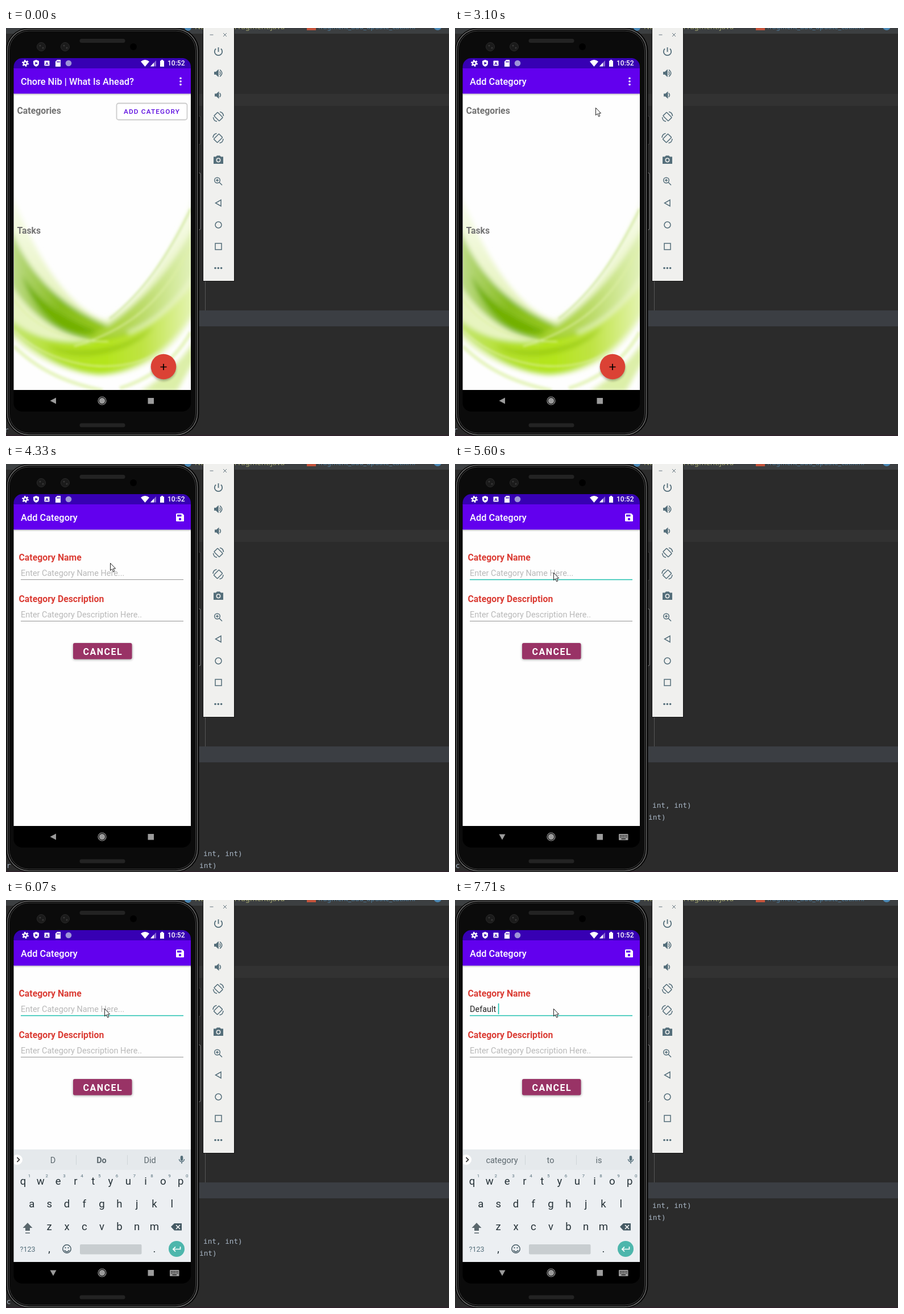
An HTML page for the animation above (8 s loop, 779x718 px).

```html
<!DOCTYPE html>
<html lang="en">
<head>
<meta charset="utf-8">
<title>Add a category</title>
<style>
html, body { margin: 0; width: 100%; height: 100%; overflow: hidden; background: #2b2b2b; }
svg { display: block; width: 779px; height: 718px; }
text { font-family: Roboto, sans-serif; white-space: pre; }
.mid { text-anchor: middle; }
.log text { font: 12.7px "DejaVu Sans Mono", monospace; fill: #a9b7c6; }
.tab text { font: 13.2px "Noto Sans", sans-serif; }
.title { font-size: 16.4px; font-weight: 500; fill: #fff; }
.head { font-size: 15.8px; font-weight: 700; fill: #737373; }
.red { fill: #db3d35; }
.field { font-size: 14.45px; fill: #b8b8b8; }
.keys { font-size: 18.6px; fill: #263238; }
.line { fill: none; stroke: #546e7a; stroke-width: 1.5; }
.solid { fill: #546e7a; }
</style>
</head>
<body>
<svg viewBox="0 0 779 718">
<defs>
  <clipPath id="page"><rect x="14" y="115" width="311" height="522"/></clipPath>
  <clipPath id="screen"><rect x="13.500" y="53" width="311.500" height="622" rx="15"/></clipPath>
  <filter id="soft" x="-20%" y="-20%" width="140%" height="140%"><feGaussianBlur stdDeviation="4"/></filter>
  <filter id="fine" x="-20%" y="-20%" width="140%" height="140%"><feGaussianBlur stdDeviation="2"/></filter>
  <linearGradient id="left"><stop stop-color="#bfdc8c"/><stop offset=".4" stop-color="#86bd1c"/><stop offset="1" stop-color="#a2d020"/></linearGradient>
  <linearGradient id="right"><stop stop-color="#a0d020"/><stop offset=".5" stop-color="#bada66"/><stop offset="1" stop-color="#e4f3bf"/></linearGradient>
  <linearGradient id="lime"><stop stop-color="#c6e678"/><stop offset=".25" stop-color="#b4e02e"/><stop offset=".5" stop-color="#b4e51a"/><stop offset=".72" stop-color="#bfe344"/><stop offset="1" stop-color="#e6f5b8"/></linearGradient>
  <linearGradient id="wash" x2="0" y2="1"><stop stop-color="#fafdf0"/><stop offset=".6" stop-color="#e6f3bf"/><stop offset="1" stop-color="#e9f6bf"/></linearGradient>
  <linearGradient id="shade" x2="0" y2="1"><stop stop-opacity=".25"/><stop offset="1" stop-opacity="0"/></linearGradient>
</defs>

<!-- editor -->
<rect width="779" height="718" fill="#2b2b2b"/>
<rect width="779" height="10" fill="#3c3f41"/>
<g class="tab">
  <circle cx="320" cy="-1" r="6" fill="#4a88b5"/>
  <text x="332" y="2" fill="#a5a872">NewCatListFragment.java</text>
  <rect x="529" y="-9" width="16" height="13" fill="#c4533b"/>
  <text x="549" y="2" fill="#4f7d9c" style="font-size:12px">fragment_add_update_cat.xml</text>
  <circle cx="759" cy="-3" r="7" fill="#4a88b5"/>
</g>
<rect y="116" width="779" height="21" fill="#323232"/>
<path d="M350.5 440V497" stroke="#555"/>
<rect y="497" width="779" height="28" fill="#3b3e43"/>
<g class="log" id="log">
  <text x="-3" y="-17">r</text>
  <text x="347" y="4">int, int)</text>
  <text x="-7" y="25">er</text><text x="340" y="25">int)</text>
  <text x="-7" y="110">ic</text>
</g>
<path d="M0 717H779" stroke="#30232c" stroke-width="2"/>

<!-- phone -->
<rect x="336" y="155" width="6" height="50" rx="2" fill="#111" stroke="#4a4a4a"/>
<rect x="336" y="255" width="6" height="100" rx="2" fill="#111" stroke="#888"/>
<rect x="0" y="0" width="339.500" height="718" rx="40" fill="#050505"/>
<rect x="2.500" y="2" width="334" height="714" rx="38" fill="none" stroke="#6a6a6a" stroke-width="1.500"/>
<rect x="5.500" y="5" width="328" height="708" rx="35" fill="#0b0b0b" stroke="#444"/>
<path d="M133 22.500H206M133 699H206" stroke="#232323" stroke-width="7" stroke-linecap="round"/>
<g fill="#1b1b1b" stroke="#2a2a2a"><circle cx="62" cy="33" r="7.500"/><circle cx="104" cy="33" r="7.500"/></g>
<g fill="#383838"><circle cx="60" cy="31" r="1.500"/><circle cx="65" cy="35" r="1.500"/><circle cx="102" cy="31" r="1.500"/><circle cx="107" cy="35" r="1.500"/></g>
<circle cx="224" cy="33" r="6" fill="#000"/>

<g clip-path="url(#screen)">
  <rect x="13" y="53" width="312" height="622" fill="#000"/>
  <rect x="13" y="115" width="312" height="522" fill="#fefefe"/>

  <g id="home" clip-path="url(#page)">
    <g filter="url(#soft)">
      <path d="M8 285C50 400 110 495 175 514C240 485 300 380 332 290V500C290 580 230 610 165 612C90 605 30 570 8 540Z" fill="url(#wash)"/>
      <path d="M8 350C40 440 110 505 225 540C170 568 70 548 8 450Z" fill="url(#left)"/>
      <path d="M332 345C290 425 240 490 140 548C220 550 290 500 332 425Z" fill="url(#right)"/>
      <path d="M8 512C50 550 100 556 165 550C240 542 290 500 332 445V485C300 560 230 609 165 610C110 608 50 575 8 530Z" fill="url(#lime)"/>
      <path d="M28 435C62 488 105 512 160 534C115 548 55 515 28 435Z" fill="#72b000"/>
      <path d="M70 558C125 575 200 570 260 525C220 575 120 594 70 558Z" fill="#9dce14"/>
      <path d="M332 550C300 595 270 620 235 640H300C312 620 322 600 332 585Z" fill="#dcefa8"/>
    </g>
    <g filter="url(#fine)" fill="none">
      <path d="M325 318C285 400 245 462 182 512" stroke="#cfe69c" stroke-width="3"/>
      <path d="M14 478C50 530 110 552 180 552M325 385C275 480 220 530 120 560M14 532C70 590 190 620 270 570" stroke="#dff0a6" stroke-width="2"/>
      <path d="M14 560C60 605 110 625 170 638M200 634C260 615 300 580 325 535" stroke="#e8f5c4" stroke-width="7"/>
    </g>
    <text class="head" x="19.500" y="151">Categories</text>
    <text class="head" x="19.500" y="362">Tasks</text>
    <g id="add">
      <rect x="194.500" y="132.500" width="124" height="29" rx="3.500" fill="#fff" stroke="#ccc" stroke-width="1.800"/>
      <rect id="ripple" x="195" y="133" width="123" height="28" rx="3" fill="#6200ee" opacity=".12"/>
      <text x="207" y="151" font-size="11.800" font-weight="500" letter-spacing="1.150" fill="#5c0be0">ADD CATEGORY</text>
    </g>
    <circle cx="277" cy="599" r="22" opacity=".3" filter="url(#fine)"/>
    <circle cx="277" cy="596" r="22.300" fill="#db4235"/>
    <path d="M271.500 596.500H282.500M277 591V602" stroke="#000" stroke-width="1.700"/>
  </g>

  <g id="form">
    <text class="head red" x="22.500" y="170">Category Name</text>
    <text class="field" id="name" x="26" y="197"></text>
    <path id="compose" stroke="#333"/>
    <path id="rule1" d="M26 203.500H312"/>
    <rect id="caret" y="182" width="1.600" height="19" fill="#15c5b3"/>
    <text class="head red" x="22.500" y="243">Category Description</text>
    <text class="field" x="26" y="270">Enter Category Description Here..</text>
    <path d="M26 276.500H312" stroke="#949494"/>
    <rect x="118" y="316.500" width="104" height="28" rx="3" opacity=".35" filter="url(#fine)"/>
    <rect x="118" y="315" width="103.500" height="28.500" rx="3" fill="#993366"/>
    <text x="135.500" y="335.700" font-size="16" font-weight="700" letter-spacing="1.500" fill="#fff">CANCEL</text>
  </g>

  <g clip-path="url(#page)"><g id="board">
    <rect x="14" y="439" width="311" height="200" fill="#eceff2"/>
    <rect x="14" y="439" width="311" height="36" fill="#e5e9ec"/>
    <circle cx="20" cy="457" r="9" fill="#fff"/>
    <path d="M19.500 453L23.500 457L19.500 461" fill="none" stroke="#222" stroke-width="1.700"/>
    <path d="M123.500 449V466M213.500 449V466" stroke="#cfd5d8"/>
    <g id="hints" class="mid" font-size="14.500" fill="#5c686e"></g>
    <rect x="306.700" y="450" width="4.600" height="9" rx="2.300" class="solid"/>
    <path d="M304.500 456A4.500 4.500 0 0 0 313.500 456M309 460.500V464" class="line"/>
    <g id="keys" class="keys mid"></g>
    <path d="M38 568L46.500 577H42V582H34V577H29.500ZM34 585.200H42V586.800H34Z" fill="#5a676d"/>
    <path d="M290 575L296 569H309V581.500H296Z" fill="#455a64"/>
    <path d="M299 572L306 579M306 572L299 579" stroke="#fff" stroke-width="1.500"/>
    <text class="mid" x="38" y="619" font-size="12.500" fill="#546e7a">?123</text>
    <g class="line" style="stroke:#455a64"><circle cx="107" cy="614" r="7.200"/><path d="M103 616A4.200 4.200 0 0 0 111 616"/></g>
    <circle cx="104.500" cy="612" r="1.200" class="solid"/><circle cx="109.500" cy="612" r="1.200" class="solid"/>
    <rect x="130" y="606" width="108.500" height="17.500" rx="2" fill="#c8cdd0"/>
    <circle cx="300" cy="614" r="14" fill="#4db6ac"/>
    <path d="M306.500 610V614.500H294M298 610.300L293.800 614.500L298 618.700" fill="none" stroke="#fff" stroke-width="1.700"/>
  </g></g>

  <!-- bars -->
  <rect x="13" y="115" width="312" height="4" fill="url(#shade)"/>
  <rect x="13" y="53" width="312" height="19" fill="#3700b3"/>
  <rect x="13" y="71" width="312" height="44.500" fill="#6200ee"/>
  <g fill="#fff">
    <circle cx="34" cy="62" r="5" fill="none" stroke="#fff" stroke-width="2" stroke-dasharray="2.600"/>
    <circle cx="34" cy="62" r="3" fill="none" stroke="#fff" stroke-width="2.400"/>
    <path d="M53 56L58 58V62C58 65 56 67 53 68C50 67 48 65 48 62V58Z"/>
    <path d="M51.500 59.500L56 62L51.500 64.500Z" fill="#3700b3"/>
    <rect x="67.500" y="57.500" width="9" height="9" rx="1"/>
    <text class="mid" x="72" y="65" font-size="8" font-weight="700" fill="#3700b3">A</text>
    <path d="M90 56H96V68H87V59Z"/>
    <path d="M90 58V61M92 58V61M94 58V61" stroke="#3700b3"/>
    <circle cx="110" cy="62" r="5.300" fill="#9d94d8"/>
    <path d="M237 59Q244.500 53 252 59L244.500 68Z"/>
    <path d="M254 67.500L264 57V67.500Z" opacity=".4"/><path d="M254 67.500L260 61V67.500Z"/>
    <path d="M271 57.500H273V56H276V57.500H278V68H271Z"/>
    <text x="284" y="66.300" font-size="12" font-weight="500">10:52</text>
    <text class="title" id="title" x="26" y="100"></text>
    <g id="dots"><circle cx="307" cy="88.500" r="1.800"/><circle cx="307" cy="94" r="1.800"/><circle cx="307" cy="99.500" r="1.800"/></g>
    <g id="save"><path d="M300.500 87H310L313 90V100Q313 101 312 101H300.500Q299 101 299 99.500V88.500Q299 87 300.500 87Z"/><path d="M301 89H308.500V92.500H301Z" fill="#6200ee"/><circle cx="306" cy="97" r="2.200" fill="#6200ee"/></g>
  </g>
  <g fill="#9b9b9b">
    <path id="back"/>
    <circle cx="169" cy="656" r="5.300"/><circle cx="169" cy="656" r="7" fill="none" stroke="#9b9b9b" stroke-width="1.200"/>
    <rect x="249.500" y="651" width="10.500" height="10.500"/>
    <g id="switch"><rect x="288" y="651" width="16.500" height="11" rx="1"/><path d="M290 653.700H303M290 656.500H303" stroke="#000" stroke-width="1.400" stroke-dasharray="1.400"/><path d="M292.500 659.700H300" stroke="#000" stroke-width="1.300"/></g>
  </g>
</g>

<!-- emulator toolbar -->
<rect x="346" y="-2" width="56" height="448" fill="#111"/>
<rect x="347" y="-2" width="54" height="447" fill="#f0f0ee"/>
<path d="M358.500 12H364.500M382 9L388 15M388 9L382 15" stroke="#667780"/>
<g class="line">
  <path d="M369 36.500A6.700 6.700 0 1 0 378 36.500M373.500 34V42" stroke-width="1.800"/>
  <path d="M375.500 76.500Q378 79.500 375.500 82.500M376 73.500Q383.500 79.500 376 85.500M375.800 114.500Q379 118 375.800 121.500"/>
  <g id="turn" transform="translate(373.500 156)">
    <rect x="-4.500" y="-6.500" width="9" height="13" rx="1" transform="rotate(-45)"/>
    <path d="M2.500 -8.500Q8.500 -7.500 9 -1M-2.500 8.500Q-8.500 7.500 -9 1"/>
  </g>
  <use href="#turn" transform="matrix(-1 0 0 1 746.500 38)"/>
  <circle cx="371.500" cy="268" r="4.800"/><path d="M375 271.500L380 276.500M369 268H374M371.500 265.500V270.500"/>
  <path d="M378 302.500V313.500L368.500 308Z"/>
  <circle cx="373.500" cy="346.500" r="5.500"/>
  <rect x="368" y="379" width="11" height="11"/>
</g>
<g class="solid">
  <path d="M366 77H369L373.800 72.500V86.500L369 82H366ZM367 115.500H370L374.500 111.500V124.500L370 120.500H367Z"/>
  <path d="M365 226.500H369L371 224.500H376L378 226.500H382V239H365Z"/>
  <circle cx="373.500" cy="232.500" r="3.200" fill="#546e7a" stroke="#f0f0ee" stroke-width="1.500"/>
  <circle cx="368" cy="422.500" r="1.800"/><circle cx="373.300" cy="422.500" r="1.800"/><circle cx="378.600" cy="422.500" r="1.800"/>
</g>

<g id="mouse">
  <circle id="click" r="12.500" fill="#ff0" opacity=".47"/>
  <path d="M.5.5V13.500L3.500 10.800L5.700 15.800L7.800 14.800L5.700 10H9.600Z" fill="#fff" stroke="#222"/>
</g>
</svg>
<script>
const $ = id => document.getElementById(id);
const show = (id, on) => $(id).style.display = on ? "" : "none";
const set = (id, attrs) => { for (const k in attrs) $(id).setAttribute(k, attrs[k]); };
const label = (x, y, s, extra = "") => `<text x="${x}" y="${y}" ${extra}>${s}</text>`;
// value of the last entry that has begun
const at = (list, t) => list.reduce((v, [start, next]) => t >= start ? next : v, list[0][1]);

// [begin, end, steps, from, to, easing power in x]
const moves = [
  [440, 740, 5, [547, 722], [327, 304], 1],
  [1220, 1600, 6, [327, 304], [247, 115], 1],
  [1760, 2280, 8, [247, 115], [247, 140], 1],
  [3940, 4560, 9, [247, 140], [173, 191], 1.8]
];
const titles = [[0, "Chore Nib | What Is Ahead?"], [3030, "Add Category"]];
const typed = [[0, ""], [6140, "D"], [6310, "De"], [6460, "Def"], [6610, "Defa"],
  [6870, "Defau"], [7100, "Defaul"], [7240, "Default"], [7630, "Default "]];
const hints = [[0, "D Do Did"], [6310, "De Dear Day"], [6460, "Def Default Definitely"],
  [6610, "Defa Default Defaults"], [6940, "Defau Default Defaults"], [7170, "Defaul Default Defaults"],
  [7240, "Default Defaults Defaulted"], [7710, "category to is"]];
const logLines = [[0, 0], [3560, 1], [3710, 2], [5110, 4], [5200, 5], [5280, 6], [7480, 9]];
const drops = [[0, 200], [5830, 130], [5910, 55], [5990, 14], [6070, 0]];

const rows = [["qwertyuiop", 30, 501], ["asdfghjkl", 45.4, 541], ["zxcvbnm", 76.2, 581]];
$("keys").innerHTML = rows.map(([s, x, y], r) => [...s].map((c, i) =>
  label(x + 30.8 * i, y, c) + (r ? "" : label(x + 30.8 * i + 11, y - 13, (i + 1) % 10, 'font-size="8" fill="#546e7a"'))
).join("")).join("") + label(76, 620, ",") + label(261, 620, ".");

function mousePos(t) {
  const m = moves.filter(m => t >= m[0]).pop();
  if (!m) return null;
  const [begin, end, n, a, b, power] = m;
  const i = Math.min(n - 1, Math.floor((t - begin) / (end - begin) * (n - 1) + 1e-6));
  const p = (i + 1) / n, q = 1 - (1 - p) ** power;
  return [Math.round(a[0] + (b[0] - a[0]) * q), Math.round(a[1] + (b[1] - a[1]) * p)];
}

function draw(t) {
  const onForm = t >= 3410, focus = t >= 5030, navDown = t >= 5600;
  show("home", !onForm);
  show("form", onForm);
  show("dots", !onForm);
  show("save", onForm);
  show("add", t < 3100);
  show("ripple", t >= 2960);
  $("title").textContent = at(titles, t);

  const word = at(typed, t), name = $("name");
  name.textContent = word || "Enter Category Name Here...";
  name.style.fill = word ? "#222" : "";
  const end = 26 + (word ? name.getComputedTextLength() : 0);
  set("caret", { x: end });
  show("caret", t >= 5110 && !navDown || t >= 6140);
  set("compose", { d: `M26 199.500H${end}` });
  show("compose", word && t < 7630);
  set("rule1", { stroke: focus ? "#1fbfae" : "#949494", "stroke-width": focus ? 1.6 : 1 });

  show("board", t >= 5830);
  set("board", { transform: `translate(0 ${at(drops, t)})` });
  $("hints").innerHTML = at(hints, t).split(" ").map((s, i) =>
    label([82.5, 168, 253][i], 462.5, s, i == 1 && t < 7710 ? 'font-weight="700"' : "")).join("");
  set("back", { d: navDown ? "M77.500 651.500H88.500L83 661.500Z" : "M88 650.500V661.500L77.500 656Z" });
  show("switch", navDown);
  set("log", { transform: `translate(0 ${728.5 - 21.2 * at(logLines, t)})` });

  const pos = mousePos(t);
  show("mouse", pos);
  if (pos) set("mouse", { transform: `translate(${pos})` });
  show("click", t >= 2800 && t < 2960 || t >= 4880 && t < 5030);
}

function tick() {
  draw(performance.now() % 8000);
  requestAnimationFrame(tick);
}
tick();
</script>
</body>
</html>
```
